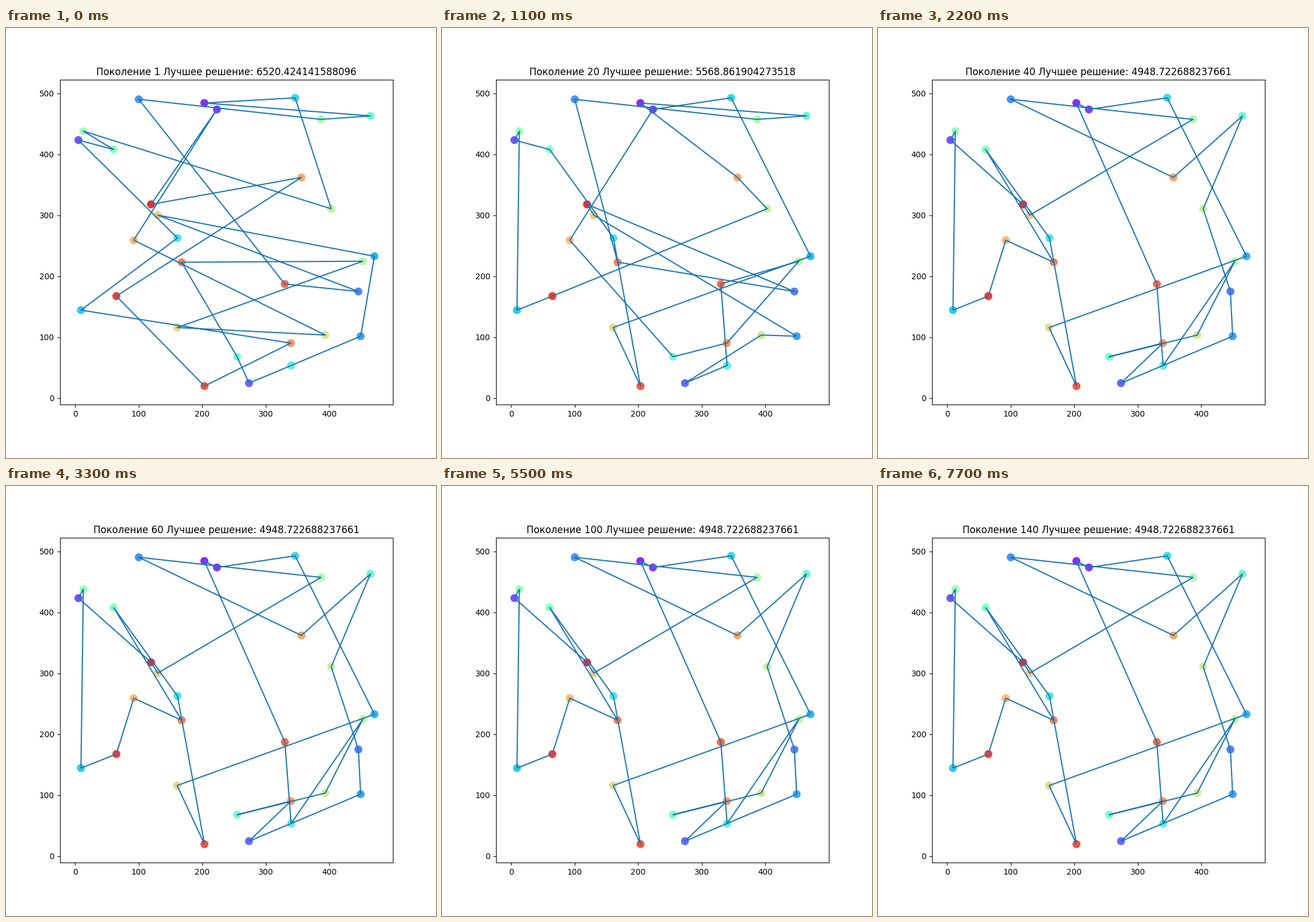
Recreate the animation shown at these times as a matplotlib script. Size 748 px wide and 748 px high, loop 8000 ms.

```python
import matplotlib.pyplot as plt
import numpy as np
from matplotlib.animation import FuncAnimation

SIZE, DPI = 748, 100
INTERVAL, FRAMES = 50, 160
HOLD = 11  # frames per shown generation

# Cities in colour order
CITIES = {
    "B": (203.2, 484.4), "C": (223.0, 473.8), "H": (5.0, 423.5),
    "c": (273.5, 24.4), "T": (445.7, 174.9), "A": (100.0, 490.5),
    "Y": (449.3, 101.5), "Q": (471.0, 232.8), "V": (9.0, 144.3),
    "D": (346.2, 492.9), "O": (160.9, 262.7), "b": (339.8, 53.4),
    "E": (464.7, 463.2), "a": (254.8, 67.7), "I": (60.4, 408.0),
    "G": (12.7, 438.2), "F": (386.9, 457.5), "R": (452.7, 224.6),
    "M": (402.9, 310.7), "X": (393.5, 103.4), "W": (160.4, 115.7),
    "L": (129.9, 300.3), "N": (92.1, 259.2), "J": (356.0, 362.2),
    "Z": (339.4, 90.2), "P": (167.4, 223.0), "S": (329.9, 187.2),
    "d": (203.4, 19.6), "U": (64.7, 167.4), "K": (119.3, 318.0),
}

# Best route and its length; the last one holds to the end
BEST = [
    ("AFEBDMGIHOVZdUJKCNXWRPacbYQLTS", "6520.424141588096"),
    ("AFEBJMOIHGVUdZKDCNbWRSacXYQLTP", "5792.624496679653"),
    ("AFEBJMUVGHIOdWQDCNaZRSbcXYLKTP", "5568.861904273518"),
    ("AFEBJMUVHGIOdWQDCNaZRSbcXYLKTP", "5553.2541668764015"),
    ("AFLKHGVUNPIOdWQDCBSbRXaZcYTMEJ", "4948.722688237661"),
]


def closed_path(route):
    return np.array([CITIES[c] for c in route + route[0]]).T


fig = plt.figure(figsize=(SIZE / DPI, SIZE / DPI), dpi=DPI, facecolor="white")
ax = fig.add_axes([0.125, 93 / SIZE, 0.775, 565 / SIZE])
ax.set_xlim(-24.4, 500.2)
ax.set_ylim(-10.7, 522.6)
ax.set_xticks(range(0, 500, 100))
ax.set_yticks(range(0, 600, 100))

xs, ys = zip(*CITIES.values())
ax.scatter(xs, ys, s=100, c=np.arange(len(xs)), cmap="rainbow",
           alpha=0.85, linewidths=0)
line, = ax.plot([], [], color="#1f77b4", lw=1.5)
title = ax.set_title("", fontsize=12)


def update(i):
    step = i // HOLD
    route, length = BEST[min(step, len(BEST) - 1)]
    line.set_data(*closed_path(route))
    title.set_text(f"Поколение {max(1, 10 * step)} Лучшее решение: {length}")
    return line, title


anim = FuncAnimation(fig, update, frames=FRAMES, interval=INTERVAL,
                     init_func=lambda: update(0), repeat=True, repeat_delay=0)
plt.show()
```
